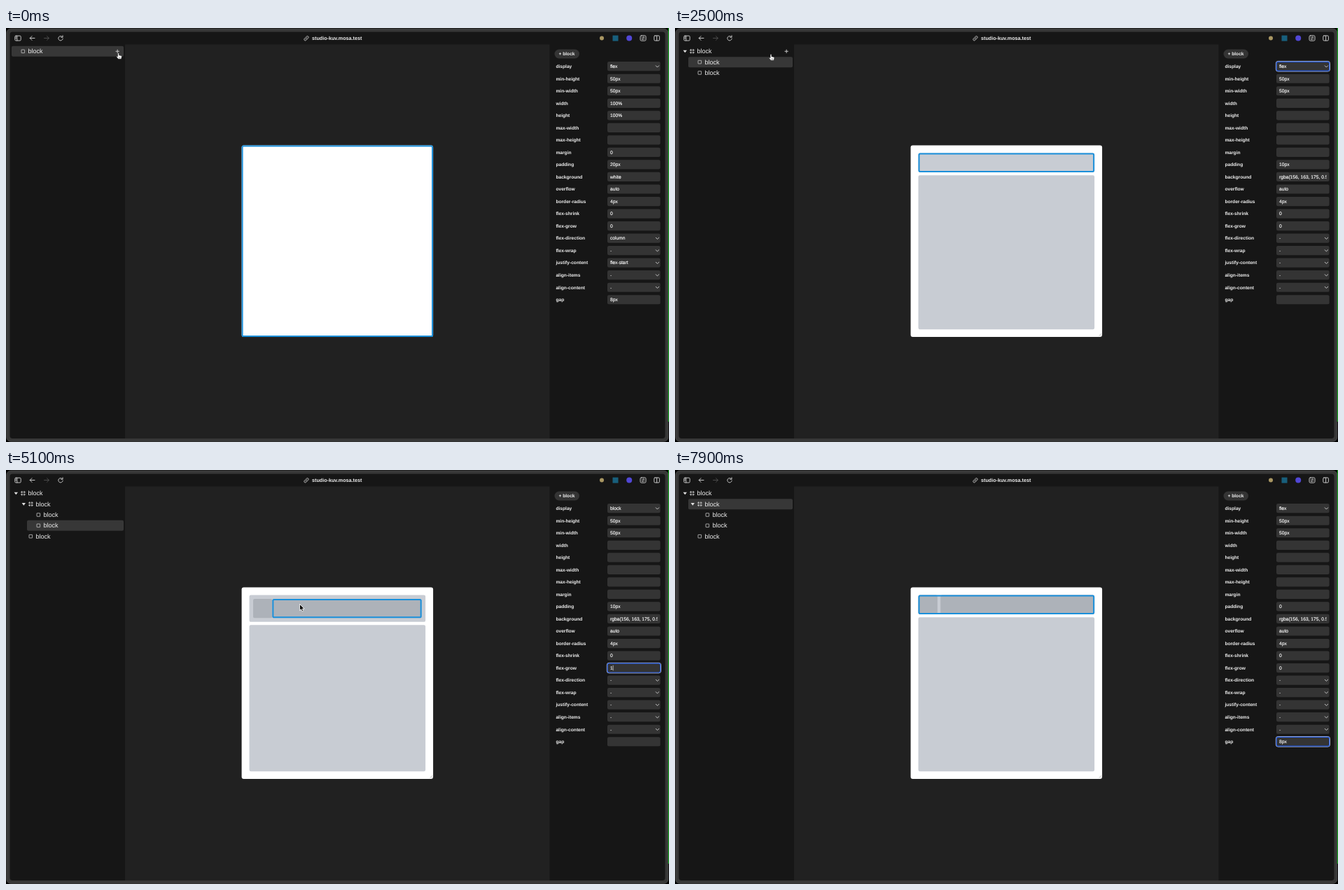
An HTML page that plays this animation: 947 px wide and 591 px high, repeating every 8 s.

```html
<!DOCTYPE html>
<html lang="en">
<head>
<meta charset="utf-8">
<title>Block editor</title>
<style>
  html, body { margin: 0; width: 100%; height: 100%; overflow: hidden; background: #000; }
  svg { display: block; width: 947px; height: 591px; }
  text { font-family: "Liberation Sans", Arial, sans-serif; fill: #f0f0f0; text-rendering: geometricPrecision; }
  .label { font-size: 6.65px; font-weight: 700; }
  .value { font-size: 6.7px; fill: #fff; stroke: #fff; stroke-width: .15px; }
  .row { font-size: 9px; }
  .line { fill: none; stroke: #c4c4c4; stroke-width: 1; stroke-linecap: round; stroke-linejoin: round; }
</style>
</head>
<body>
<svg viewBox="0 0 947 591" xmlns="http://www.w3.org/2000/svg">
  <defs><clipPath id="fields"><rect x="861" y="46" width="69.5" height="350"/></clipPath></defs>
  <rect width="947" height="591" fill="#000"/>
  <rect x=".8" y="1" width="945" height="589.3" rx="6" fill="#373737" stroke="#525252" stroke-width=".7"/>
  <rect x="945.8" width="1.2" height="562" fill="#149a1c"/>
  <rect x="5.5" y="5.5" width="936" height="580.5" rx="4" fill="#161616"/>
  <rect x="170" y="23.5" width="606.5" height="562.5" fill="#212121"/>

  <!-- toolbar -->
  <g class="line">
    <rect x="12.8" y="11.2" width="8.4" height="6.8" rx="1.3"/>
    <path d="M15.8 11.2v6.8M13.8 13h.8M13.8 14.8h.8"/>
    <path d="M41 14.5H34.2M37 11.6L34.2 14.5L37 17.4"/>
    <path d="M54.5 14.5h6.8M58.5 11.6l2.8 2.9l-2.8 2.9" stroke="#4b4b4b"/>
    <path d="M80.7 13A3.2 3.2 0 1 0 81.2 15.2M81 10.8v2.4h-2.4"/>
    <path transform="translate(429 14.8) rotate(-45)" stroke-width=".9"
      d="M.3 -1.6H2.2a1.6 1.6 0 0 1 0 3.2H.3M-.3 1.6H-2.2a1.6 1.6 0 0 1 0 -3.2H-.3M-1.6 0H1.6"/>
    <rect x="906" y="10.8" width="8" height="7.4" rx="1.6"/>
    <path d="M908 13.2h4M908 15.8h4M910.8 12.4v1.6M909.2 15v1.6" stroke-width=".8"/>
    <rect x="925.8" y="11" width="7.6" height="7" rx="1.2"/><path d="M929.6 11v7"/>
  </g>
  <circle cx="851" cy="14.6" r="3" fill="#a99763"/>
  <rect x="866.5" y="10.6" width="8" height="8" fill="#185f7c"/>
  <circle cx="890.2" cy="14.6" r="4" fill="#5147d6"/>
  <text x="437" y="17.2" font-size="7.2" font-weight="700">studio-kuv.mosa.test</text>

  <rect x="783.5" y="30.5" width="35.5" height="13" rx="6.5" fill="#343434"/>
  <text class="label" x="789.5" y="39.4">+ block</text>

  <g id="tree"></g>
  <g id="panel"></g>
  <g id="stage"></g>
  <g id="pointer"></g>
</svg>
<script>
const LOOP = 8000, STEP = 100;
const PX = .547; // screen size of one page pixel
const ROW_TOP = 25.6, ROW_H = 15.35, FIELD_TOP = 54.7, FIELD_H = 17.53;
const FILLS = ['#fff', '#c8ccd3', '#adb2b9'];

const blockStyle = {
  'display': 'block', 'min-height': '50px', 'min-width': '50px', 'width': '', 'height': '',
  'max-width': '', 'max-height': '', 'margin': '', 'padding': '10px',
  'background': 'rgba(156, 163, 175, 0.5)', 'overflow': 'auto', 'border-radius': '4px',
  'flex-shrink': '0', 'flex-grow': '0', 'flex-direction': '-', 'flex-wrap': '-',
  'justify-content': '-', 'align-items': '-', 'align-content': '-', 'gap': ''
};
const rootStyle = {
  ...blockStyle, 'display': 'flex', 'width': '100%', 'height': '100%', 'margin': '0', 'padding': '20px',
  'background': 'white', 'flex-direction': 'column', 'justify-content': 'flex-start', 'gap': '8px'
};
const props = Object.keys(blockStyle);
const isSelect = name => name === 'display' || blockStyle[name] === '-';
const fieldY = name => FIELD_TOP + FIELD_H * props.indexOf(name);

// editor actions, each given the state and the time since it began
const select = find => s => { s.selected = find(s.root); s.focus = s.keyTime = null; };
const add = find => s => {
  s.selected = { style: { ...blockStyle }, kids: [] };
  find(s.root).kids.push(s.selected);
  s.focus = s.keyTime = null;
};
const focus = name => s => { s.focus = name; s.keyTime = null; };
const type = word => (s, age, at) => {
  const n = isSelect(s.focus) ? word.length : Math.min(word.length, 1 + Math.floor(age / STEP));
  s.selected.style[s.focus] = word.slice(0, n);
  s.keyTime = at + (n - 1) * STEP;
  s.typedAt = at;
};

const root = r => r, head = r => r.kids[0];
const actions = [
  [100, add(root)], [300, add(root)],
  [1000, focus('flex-grow')], [1200, type('1')],
  [1400, select(head)],
  [1800, focus('display')], [1900, type('flex')],
  [2800, add(head)], [3000, add(head)],
  [3700, focus('flex-grow')], [3800, type('1')],
  [5300, select(head)],
  [6700, focus('padding')], [6900, type('0')],
  [7500, focus('gap')], [7700, type('8px')]
];

// pointer moves: start, end, goal
const plus = row => [160, ROW_TOP + ROW_H * row + 7];
const label = (name, x = 800) => [x, fieldY(name) - 3];
const moves = [
  [0, 0, plus(.2)],
  [350, 500, [235, 16]],
  [500, 1000, label('flex-grow', 788)],
  [1200, 1400, [575, 204]],
  [1400, 1640, label('display')],
  [1900, 2300, [50, 62]],
  [2300, 2500, [136.5, 37.5]],
  [2500, 2600, plus(1)],
  [3000, 3600, label('flex-direction')],
  [3600, 3700, label('flex-grow')],
  [3900, 4100, [901, 179]],
  [4100, 4500, [630, 64]],
  [4500, 5300, [380.5, 215]],
  [5400, 6000, [824, 303]],
  [6300, 6700, label('padding', 805)],
  [7000, 7400, label('gap')]
];

const ease = k => k * k * (3 - 2 * k);
const rect = (x, y, w, h, r, fill, more = '') =>
  `<rect x="${x}" y="${y}" width="${w}" height="${h}" rx="${r}" fill="${fill}" ${more}/>`;
const ring = (x, y, w, h, inset, r, color, width) =>
  rect(x + inset, y + inset, w - 2 * inset, h - 2 * inset, r, 'none', `stroke="${color}" stroke-width="${width}"`);
const text = (cls, x, y, s) => `<text class="${cls}" x="${x}" y="${y}">${s}</text>`;
const put = (id, html) => { document.getElementById(id).innerHTML = html; };
const length = s => /^\d+px$/.test(s) ? parseFloat(s) * PX : 0;

function stateAt(t) {
  const page = { style: { ...rootStyle }, kids: [] };
  const s = { root: page, selected: page, focus: null, keyTime: null, typedAt: -1 };
  for (const [at, act] of actions) if (t >= at) act(s, t - at, at);
  return s;
}

function pointerAt(t, typedAt) {
  let [x, y] = moves[0][2], moved = 0;
  for (const [from, to, goal] of moves) {
    if (t < from) break;
    const k = ease(Math.min(1, (t - from) / (to - from || 1)));
    x += (goal[0] - x) * k;
    y += (goal[1] - y) * k;
    moved = from;
  }
  return { x, y, hidden: typedAt > moved };
}

// flex layout
const isColumn = node => node.style['flex-direction'] === 'column';

function naturalSize(node, vertical) {
  const sizes = node.kids.map(kid => naturalSize(kid, vertical));
  const along = isColumn(node) === vertical;
  const content = along
    ? sizes.reduce((a, b) => a + b, 0) + length(node.style.gap) * Math.max(0, sizes.length - 1)
    : Math.max(0, ...sizes);
  const min = length(node.style[vertical ? 'min-height' : 'min-width']);
  return Math.max(min, content + 2 * length(node.style.padding));
}

function layout(node, x, y, w, h, depth = 0) {
  node.box = [x, y, w, h];
  let out = rect(x, y, w, h, depth ? 2.2 : 3, FILLS[depth]);
  const column = isColumn(node), pad = length(node.style.padding), gap = length(node.style.gap);
  const sizes = node.kids.map(kid => naturalSize(kid, column));
  const grows = node.kids.map(kid => Number(kid.style['flex-grow']));
  const sum = list => list.reduce((a, b) => a + b, 0);
  const spare = (column ? h : w) - 2 * pad - sum(sizes) - gap * (sizes.length - 1);
  let offset = pad;
  node.kids.forEach((kid, i) => {
    const size = sizes[i] + (grows[i] ? spare * grows[i] / sum(grows) : 0);
    out += column
      ? layout(kid, x + pad, y + offset, w - 2 * pad, size, depth + 1)
      : layout(kid, x + offset, y + pad, size, h - 2 * pad, depth + 1);
    offset += size + gap;
  });
  return out;
}

function drawStage(s) {
  const size = 500 * PX;
  let out = layout(s.root, 336.6, 167.6, size, size);
  if (s.selected !== s.root) {
    out += '<path d="M605.6 439.6l3.4 -3.4M607.8 439.8l1.4 -1.4" stroke="#909090" stroke-width=".6"/>';
  }
  put('stage', out + ring(...s.selected.box, 1, 1.6, '#1b90db', 2));
}

function drawTree(s, p) {
  const rows = [];
  const walk = (node, depth) => {
    rows.push([node, depth]);
    node.kids.forEach(kid => walk(kid, depth + 1));
  };
  walk(s.root, 0);
  const over = p.x > 8 && p.x < 168 ? Math.floor((p.y - ROW_TOP) / ROW_H) : -1;
  put('tree', rows.map(([node, depth], i) => {
    const dx = depth * 11, y = ROW_TOP + ROW_H * (i + .5);
    let out = node === s.selected ? rect(8 + dx, y - 7.5, 160 - dx, 15, 2, '#373737') : '';
    if (node.kids.length) {
      out += `<path d="M${11.6 + dx} ${y - 1.6}h5.4l-2.7 3.6z" fill="#e0e0e0"/>`;
      out += `<path class="line" stroke-width=".8" d="M${22.8 + dx} ${y - 3}v6M${26 + dx} ${y - 3}v6` +
        `M${21.4 + dx} ${y - 1.6}h6M${21.4 + dx} ${y + 1.6}h6" stroke-dasharray="2.2 1.6"/>`;
    } else {
      out += ring(22 + dx, y - 2.3, 4.6, 4.6, 0, .3, '#c4c4c4', .8);
    }
    out += text('row', 31.5 + dx, y + 3, 'block');
    if (i === over) out += `<path class="line" stroke-width=".8" d="M157 ${y}h4.4M159.2 ${y - 2.2}v4.4"/>`;
    return out;
  }).join(''));
}

function drawPanel(s, t) {
  let out = '', words = '';
  for (const name of props) {
    const y = fieldY(name), value = s.selected.style[name];
    out += text('label', 785.4, y + 2.3, name) + rect(859, y - 6.6, 75.6, 13.2, 2.2, '#343434');
    if (isSelect(name)) out += `<path class="line" d="M928.2 ${y - .9}l2.2 2.2l2.2 -2.2"/>`;
    if (name === s.focus) {
      const box = [858, y - 7.6, 77.8, 15.2];
      out += ring(...box, .3, 3, '#e4ebff', .8) + ring(...box, 1.2, 2.2, '#2459dc', 1.2);
      const end = value.length * 3.8;
      if (!isSelect(name)) {
        if (s.keyTime === null) words += rect(862.8, y - 4, end, 8, 0, '#3d65a8');
        else if (t > s.keyTime) words += rect(863 + end, y - 3.8, .6, 7.6, 0, '#fff');
      }
    }
    words += text('value', 863, y + 2.3, value);
  }
  put('panel', out + `<g clip-path="url(#fields)">${words}</g>`);
}

const shapes = {
  arrow: '<path d="M0 0V9.2L2.1 7.3L3.5 10.5L5.2 9.8L3.8 6.7H6.6Z" fill="#080808" stroke="#fff" stroke-width=".85" stroke-linejoin="round"/>',
  hand: '<path d="M-.2 .4C.6 -.3 1.3 .2 1.4 1V3.2L4.4 3.9C5.3 4.2 5.5 4.8 5.3 5.7L4.6 8.7H.4L-2 5.7C-2.5 4.8 -1.5 4.3 -.9 4.9L-.4 5.4V1Z" fill="#fff" stroke="#161616" stroke-width=".5"/>' +
    '<path d="M1.5 6v1.7M3 6v1.7" stroke="#333" stroke-width=".5"/>',
  beam: '<path d="M-2 -4.3Q-.2 -4.3 0 -3.4Q.2 -4.3 2 -4.3M0 -3.4V3.4M-2 4.3Q-.2 4.3 0 3.4Q.2 4.3 2 4.3M-1 .9H1" fill="none" stroke="#f2f2f2" stroke-width="1"/>'
};

function drawPointer({ x, y, hidden }) {
  const field = props[Math.round((y - FIELD_TOP) / FIELD_H)];
  let kind = 'arrow';
  if (x > 8 && x < 168 && y > ROW_TOP) kind = 'hand';
  else if (x > 859 && x < 935 && field && !isSelect(field)) kind = 'beam';
  put('pointer', hidden ? '' : `<g transform="translate(${x} ${y})">${shapes[kind]}</g>`);
}

function draw(t) {
  const s = stateAt(t), p = pointerAt(t, s.typedAt);
  drawTree(s, p);
  drawPanel(s, t);
  drawStage(s);
  drawPointer(p);
}

const start = performance.now();
let shown = -1;
function tick() {
  const t = Math.floor((performance.now() - start) % LOOP / STEP) * STEP;
  if (t !== shown) draw(shown = t);
  requestAnimationFrame(tick);
}
tick();
</script>
</body>
</html>
```
